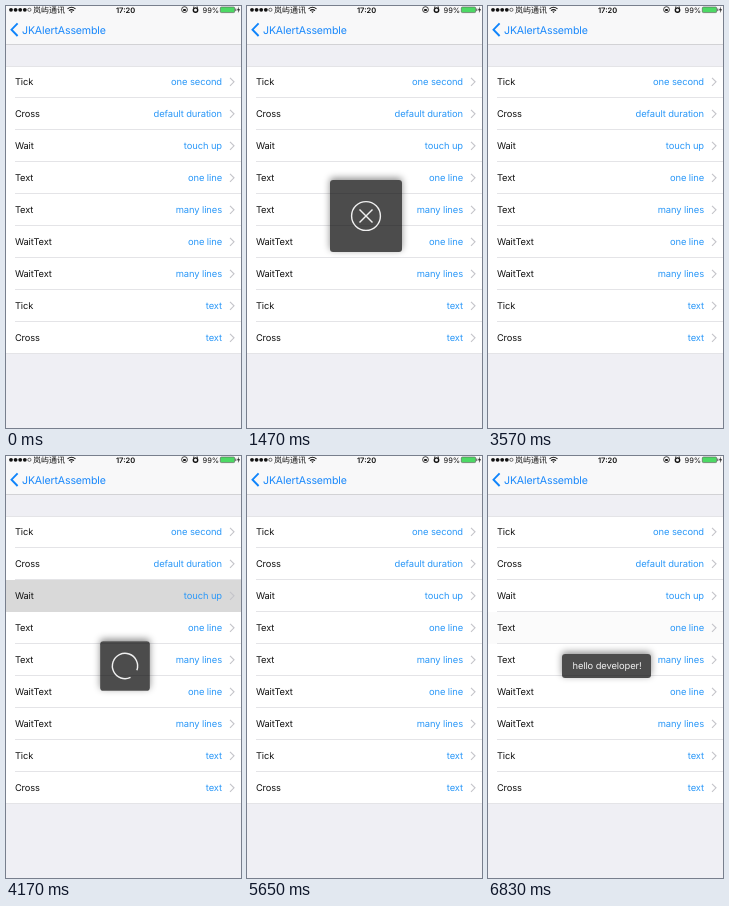
An HTML page that plays this animation: 235 by 422 pixels, repeating every 8 s.

```html
<!DOCTYPE html>
<html lang="en">
<head>
<meta charset="utf-8">
<title>Alert demo</title>
<style>
  html, body { margin: 0; width: 100%; height: 100%; overflow: hidden; background: #efeff4; }
  svg { display: block; position: absolute; left: 0; top: 0; font-family: Inter, Roboto, sans-serif;
        letter-spacing: -.1px; text-rendering: geometricPrecision; }
  .status { font-size: 7.5px; letter-spacing: 0; fill: #111; }
  .carrier { font-family: "Noto Sans CJK SC", "Noto Sans CJK", sans-serif; font-size: 8px; }
  .title { font-size: 10.6px; letter-spacing: -.15px; fill: #1787fb; }
  .label { font-size: 9.3px; fill: #111; }
  .detail { font-size: 9.4px; fill: #2b98f8; text-anchor: end; }
  .line { fill: none; stroke: #f0f0f0; stroke-width: 1.4; }
  .alert { position: absolute; border-radius: 3px; background: rgba(0, 0, 0, .7);
           box-shadow: 0 -2px 7px rgba(0, 0, 0, .45); }
  .alert svg { left: 50%; top: 50%; overflow: visible; }
</style>
</head>
<body>
<svg id="screen" width="235" height="422" viewBox="0 0 235 422">
  <rect width="235" height="38" fill="#f8f8f9"/>
  <rect y="38" width="235" height="1" fill="#d2d2d5"/>
  <g class="status" transform="translate(0 .5)">
    <g id="signal"></g>
    <text class="carrier" x="27" y="6.2">岚屿通讯</text>
    <g fill="none" stroke="#111" stroke-width="1.1">
      <path d="M61.5 2.4Q65.5-.8 69.5 2.4M63 4.2Q65.5 2 68 4.2"/>
      <circle cx="178.5" cy="3.1" r="2.9" stroke-width=".8"/>
      <circle cx="189.5" cy="3.6" r="2.2" stroke-width="1.4"/>
      <path d="M187 1.1l1.2-1M192 1.1l-1.2-1" stroke-width="1"/>
    </g>
    <path d="M64.2 5L65.5 6.6 66.8 5ZM177.2 2.6h2.6v2h-2.6ZM233 0l-2 3.8h1.5l-.7 3 2.2-4h-1.5Z"/>
    <text x="119.6" y="6.3" text-anchor="middle" font-weight="600">17:20</text>
    <text x="196.5" y="6.3">99%</text>
    <rect x="214.3" y=".5" width="14.4" height="5.6" rx="1.2" fill="#4cd964" stroke="#555" stroke-width=".6"/>
    <rect x="229.3" y="2.1" width="1" height="2.4" fill="#555"/>
  </g>
  <path d="M11.6 17.4L5.5 23.7 11.6 30" fill="none" stroke="#0f84fb" stroke-width="1.9"/>
  <text class="title" x="16" y="27.5">JKAlertAssemble</text>
  <rect y="60" width="235" height="287" fill="#fff"/>
  <g id="rows"></g>
</svg>

<div class="alert" id="cross" style="left:82.7px;top:173.7px;width:72px;height:72px">
  <svg width="1" height="1">
    <circle class="line" id="ring" r="14.4" pathLength="1" transform="scale(1 -1)"/>
    <path class="line" id="slash1" pathLength="1" d="M-6.5-6.5L6.5 6.5"/>
    <path class="line" id="slash2" pathLength="1" d="M6.5-6.5L-6.5 6.5"/>
  </svg>
</div>
<div class="alert" id="wait" style="left:94.6px;top:185.7px;width:48px;height:48px">
  <svg width="1" height="1">
    <circle class="line" id="spinner" r="12.2" pathLength="360" stroke-dasharray="316 44"/>
  </svg>
</div>
<div class="alert" id="toast" style="left:74px;top:197.7px;width:89px;height:24px">
  <svg width="1" height="1">
    <text y="3.3" text-anchor="middle" font-size="9.4" fill="#f0f0f0">hello developer!</text>
  </svg>
</div>

<script>
const LOOP = 8000;
const refreshes = [0, 440, 590, 740, 890, 1030, 1180, 1330, 1470, 3420, 3570,
  4170, 4320, 4470, 4620, 4770, 4920, 5060, 5210, 5360, 5510, 5650, 6540, 6690, 6830];
const items = [
  ['Tick', 'one second'], ['Cross', 'default duration'], ['Wait', 'touch up'],
  ['Text', 'one line'], ['Text', 'many lines'], ['WaitText', 'one line'],
  ['WaitText', 'many lines'], ['Tick', 'text'], ['Cross', 'text']];

const el = id => document.getElementById(id);
const clamp = v => Math.max(0, Math.min(1, v));
const progress = (t, start, duration) => clamp((t - start) / duration);

el('signal').innerHTML = [0, 1, 2, 3, 4].map(i =>
  `<circle cx="${5 + i * 4.6}" cy="3.3" r="${i < 4 ? 1.9 : 1.6}"
    ${i < 4 ? '' : 'fill="none" stroke="#111" stroke-width=".6"'}/>`).join('');

const separator = (x, y) => `<rect x="${x}" y="${y}" width="235" height="1" fill="#e4e4e7"/>`;
el('rows').innerHTML = separator(0, 60) + items.map(([label, detail], i) => {
  const y = 60 + i * 32;
  return `${separator(i < items.length - 1 ? 9 : 0, y + 31)}
    <rect id="glow${i}" y="${y}" width="235" height="32" fill="#d9d9d9" opacity="0"/>
    <text class="label" x="8.9" y="${y + 19.3}">${label}</text>
    <text class="detail" x="216" y="${y + 19.3}">${detail}</text>
    <path d="M224 ${y + 11.8}l4 4-4 4" fill="none" stroke="#c4c4c9" stroke-width="1.1"/>`;
}).join('');

// Scale with a slight overshoot: 1 at u = 0, bulging, then 0 at u = 1.
const shrink = u => 1 - u * u * (2 * u - 1);
const popIn = (t, shown) => shrink(1 - progress(t, shown - 126, 200));

function place(id, visible, scale, opacity = 1) {
  const style = el(id).style;
  style.visibility = visible ? 'visible' : 'hidden';
  style.transform = `scale(${scale})`;
  style.opacity = opacity;
}

function trace(id, amount) {
  el(id).style.visibility = amount > 0 ? 'inherit' : 'hidden';
  el(id).setAttribute('stroke-dasharray', amount < 1 ? `${amount} 2` : 'none');
}

function glow(row, t, pressed, fadeStart) {
  el('glow' + row).setAttribute('opacity', t < pressed ? 0 : 1 - progress(t, fadeStart, 170));
}

function draw(t) {
  glow(1, t, 440, 310);
  glow(2, t, 4170, 4170);
  glow(3, t, 6540, 6680);

  place('cross', t >= 440 && t < 3570, popIn(t, 440), t < 3420 ? 1 : .96);
  trace('ring', progress(t, 440, 440));
  trace('slash1', progress(t, 870, 270));
  trace('slash2', progress(t, 1100, 300));

  const waitScale = t < 5210 ? popIn(t, 4170) : shrink(progress(t, 5200, 430));
  place('wait', t >= 4170 && t < 5650, waitScale);
  // The stroke starts 22 degrees after the middle of the gap.
  const gap = 42 + (t - 4170) * 360 / 740;
  el('spinner').setAttribute('transform', `rotate(${gap + 22})`);

  place('toast', t >= 6540, popIn(t, 6540));
}

function tick() {
  const now = performance.now() % LOOP;
  draw(refreshes.findLast(r => r <= now));
  requestAnimationFrame(tick);
}
tick();
</script>
</body>
</html>
```
